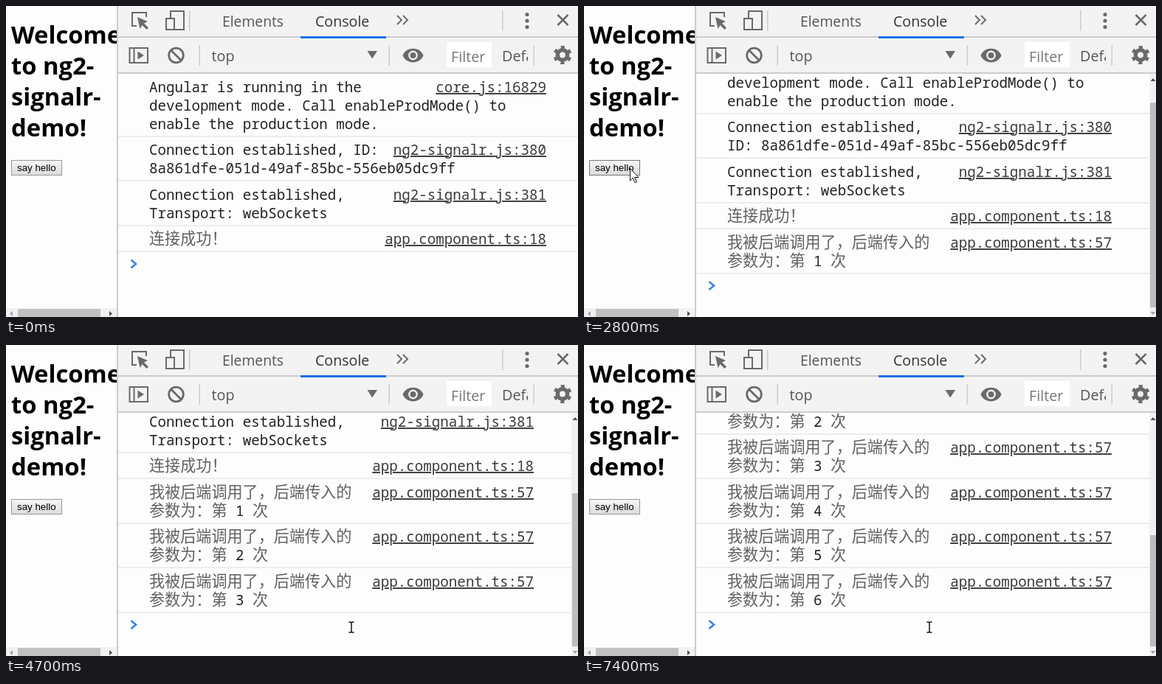
Write an HTML page that moves like this. It is 775 px wide and 422 px high and loops after 8 s.

```html
<!DOCTYPE html>
<html lang="zh-CN">
<head>
<meta charset="utf-8">
<title>ng2-signalr-demo</title>
<style>
html, body { margin: 0; width: 100%; height: 100%; overflow: hidden; background: #fdfdfd; }
svg { display: block; }
text { white-space: pre; }
.title { font: 700 32.8px "Open Sans", "Noto Sans", sans-serif; fill: #000; }
.ui { font: 19.8px "Open Sans", "Noto Sans", sans-serif; fill: #555; }
.btn { font: 13.33px "Liberation Sans", Arial, sans-serif; fill: #000; }
.log { font: 19.2px "Noto Sans Mono", monospace; fill: #222; }
.log .zh { font: 300 21.1px "Noto Sans CJK SC", "Noto Sans CJK", sans-serif; fill: #606060; }
.link { text-anchor: end; text-decoration: underline 1.6px; text-underline-offset: 2px; fill: #3a3a3a; }
.icon { fill: none; stroke: #6a6a6a; stroke-width: 2; }
.solid { fill: #6a6a6a; }
.sep { fill: #ccc; }
</style>
</head>
<body>
<svg width="775" height="422" viewBox="0 0 775 422">
  <defs>
    <clipPath id="page"><path d="M0 0H150V422H0Z"/></clipPath>
    <clipPath id="console"><path d="M152 92H775V422H152Z"/></clipPath>
    <clipPath id="level"><path d="M660 45H707V88H660Z"/></clipPath>
    <linearGradient id="face" x2="0" y2="1"><stop stop-color="#f6f6f6"/><stop offset="1" stop-color="#dcdcdc"/></linearGradient>
    <linearGradient id="down" x2="0" y2="1"><stop stop-color="#d6d6d6"/><stop offset="1" stop-color="#ececec"/></linearGradient>
  </defs>
  <rect width="775" height="422" fill="#fdfdfd"/>

  <g class="title" clip-path="url(#page)">
    <text x="7" y="51">Welcome</text>
    <text x="7" y="93">to ng2-</text>
    <text x="7" y="135">signalr-</text>
    <text x="7" y="177">demo!</text>
  </g>
  <rect id="button" x="7.5" y="209.5" width="68" height="20" fill="url(#face)" stroke="#979797"/>
  <text class="btn" x="15" y="224">say hello</text>

  <rect y="410" width="150" height="12" fill="#f1f1f1"/>
  <rect x="16" y="411" width="112" height="11" fill="#c1c1c1"/>
  <path d="M9 414V421L5 417.5Z" fill="#a3a3a3"/>
  <path d="M140 414V421L144 417.5Z" fill="#505050"/>

  <g id="log" class="log" clip-path="url(#console)"></g>
  <path id="prompt" d="M169.5 -5.500L176 0L169.5 5.500" fill="none" stroke="#3a7ff0" stroke-width="2.6"/>
  <g id="bar">
    <rect x="766" y="92" width="9" height="330" fill="#f1f1f1"/>
    <rect id="thumb" x="767" width="8" fill="#bdbdbd"/>
    <path d="M767.5 102H774.5L771 98Z" fill="#505050"/>
    <path d="M767.5 415H774.5L771 419Z" fill="#a3a3a3"/>
  </g>

  <rect x="152" width="623" height="91" fill="#f3f3f3"/>
  <path class="sep" d="M152 41H775V43H152ZM152 90H775V92H152ZM150 0H152V422H150Z"/>
  <path class="sep" d="M248 6H249.5V34H248ZM672 6H673.5V34H672ZM261.5 53H263V81H261.5ZM518.5 53H520V81H518.5ZM714.5 53H716V81H714.5Z"/>
  <rect x="399" y="41" width="116" height="3" fill="#1a73e8"/>
  <text class="ui" x="293" y="28" style="font-size:19.3px">Elements</text>
  <text class="ui" x="419" y="28" style="font-size:19.6px;fill:#333">Console</text>
  <text class="ui" x="278.5" y="75">top</text>
  <rect x="597" y="49" width="61" height="34" fill="#fff"/>
  <text class="ui" x="603" y="76" style="fill:#777">Filter</text>
  <text class="ui" x="672" y="75" clip-path="url(#level)">Default</text>

  <g class="icon">
    <path d="M177 27H171V9H190V15"/>
    <path d="M223 16V7H241V32H229M217 17H228V32H217Z"/>
    <path d="M530 13L536 19L530 25M538 13L544 19L538 25"/>
    <path d="M747.5 12L761.5 26M761.5 12L747.5 26" stroke-width="2.5"/>
    <path d="M167.5 57H192V77H167.5ZM173.5 57V77"/>
    <circle cx="230.5" cy="67" r="9.8" stroke-width="2.8"/>
    <path d="M224 60.5L237 73.5" stroke-width="2.8"/>
    <circle cx="754" cy="66.500" r="6.700" stroke-width="5.500"/>
    <circle cx="754" cy="66.500" r="10.5" stroke-width="4" stroke-dasharray="5 5.995" stroke-dashoffset="-3"/>
  </g>
  <g class="solid">
    <path d="M178 15L192 21L187 23.5L193 29.5L190.5 32L184.5 26L181.5 31Z"/>
    <path d="M178.5 61.5V72.5L187 67Z"/>
    <path d="M489.5 61H503L496.2 71.5Z"/>
    <path d="M537.5 67C542 54.500 561 54.500 565.500 67C561 79.500 542 79.500 537.500 67Z"/>
    <circle cx="706" cy="11.500" r="2.600"/><circle cx="706" cy="20" r="2.600"/><circle cx="706" cy="28.500" r="2.600"/>
  </g>
  <circle cx="551.5" cy="67" r="5.2" fill="#6a6a6a" stroke="#f3f3f3" stroke-width="2.4"/>

  <path id="arrow" d="M.5 .5V17L4.300 13.400L7 19.800L9.400 18.800L6.700 12.500H12Z" fill="#fff" stroke="#111"/>
  <path id="beam" d="M-3.500 -7H-1L0 -6L1 -7H3.500M0 -6V6M-3.500 7H-1L0 6L1 7H3.500" fill="none" stroke="#111" stroke-width="1.500"/>
</svg>
<script>
const LOOP = 8000, STEP = 100, LINE = 25, PAD = 10.5;
const CALLS = [2800, 3800, 4700, 5600, 6500, 7400];
// start, step count, index of first step, then curve: from, bend, to
const MOVES = [
  { at: 700, steps: 8, first: 0, pts: [[750, 10], [560, 110], [281, 180]] },
  { at: 1600, steps: 9, first: 1, pts: [[281, 180], [150, 185], [62, 220]] },
  { at: 3200, steps: 7, first: 1, pts: [[62, 220], [230, 300], [468, 383]] }
];
const $ = id => document.getElementById(id);
const show = (el, on) => el.setAttribute('visibility', on ? 'visible' : 'hidden');
const place = (el, x, y) => el.setAttribute('transform', `translate(${x} ${y})`);
const ease = p => p * p * (3 - 2 * p);

const mark = s => s.replace(/[^\x00-\x7f]+/g, m => `<tspan class="zh">${m}</tspan>`);

function messages(n) {
  const id = '8a861dfe-051d-49af-85bc-556eb05dc9ff', made = 'Connection established,';
  const rows = [
    ['core.js:16829', 'Angular is running in the', 'development mode. Call enableProdMode() to', 'enable the production mode.'],
    ['ng2-signalr.js:380', ...(n ? [made, 'ID: ' + id] : [made + ' ID:', id])],
    ['ng2-signalr.js:381', made, 'Transport: webSockets'],
    ['app.component.ts:18', '连接成功！']
  ];
  for (let i = 1; i <= n; i++)
    rows.push(['app.component.ts:57', '我被后端调用了，后端传入的', `参数为：第 ${i} 次`]);
  return rows;
}

function drawLog(n) {
  const rows = messages(n);
  const height = row => (row.length - 1) * LINE + PAD;
  const total = rows.reduce((sum, row) => sum + height(row), 0);
  const right = n ? 715 : 732;
  let y = n ? 363 - total : 91.8, out = '';
  for (const row of rows) {
    const [link, ...lines] = row, base = Math.round(y + LINE);
    lines.forEach((s, i) => out += `<text x="194" y="${base + i * LINE}">${mark(s)}</text>`);
    out += `<text class="link" x="${right}" y="${base}">${link}</text>`;
    y += height(row);
    out += `<rect x="152" y="${Math.floor(y - 1)}" width="${n ? 614 : 623}" height="2" fill="#ececf1"/>`;
  }
  $('log').innerHTML = out;
  place($('prompt'), 0, n ? 379.5 : 350);
  show($('bar'), n > 0);
  if (n) {
    const size = 302 * 331 / (360 + 60.4 * (n - 1));
    $('thumb').setAttribute('y', 409 - size);
    $('thumb').setAttribute('height', size);
  }
}

function pointer(t) {
  const move = MOVES.filter(m => t >= m.at).pop();
  if (!move) return null;
  const k = Math.floor((t - move.at) / STEP) + move.first;
  const p = ease(Math.min(1, k / move.steps)), q = 1 - p;
  const [a, b, c] = move.pts;
  return [0, 1].map(i => Math.round(q * q * a[i] + 2 * p * q * b[i] + p * p * c[i]));
}

let shown = -1;
function draw(t) {
  const n = CALLS.filter(c => t >= c).length;
  if (n !== shown) drawLog(shown = n);

  const pos = pointer(t), [x, y] = pos || [0, 0];
  const text = t >= 3200 && x > 151;
  show($('arrow'), pos && !text);
  show($('beam'), text);
  place($(text ? 'beam' : 'arrow'), x, y);

  const over = pos && x > 6 && x < 77 && y > 208 && y < 231;
  const pressed = t >= 2600 && t < 2700;
  $('button').setAttribute('stroke', over ? '#777' : '#979797');
  $('button').setAttribute('fill', pressed ? 'url(#down)' : 'url(#face)');
}

const start = performance.now();
function tick() {
  draw((performance.now() - start) % LOOP);
  requestAnimationFrame(tick);
}
tick();
</script>
</body>
</html>
```
